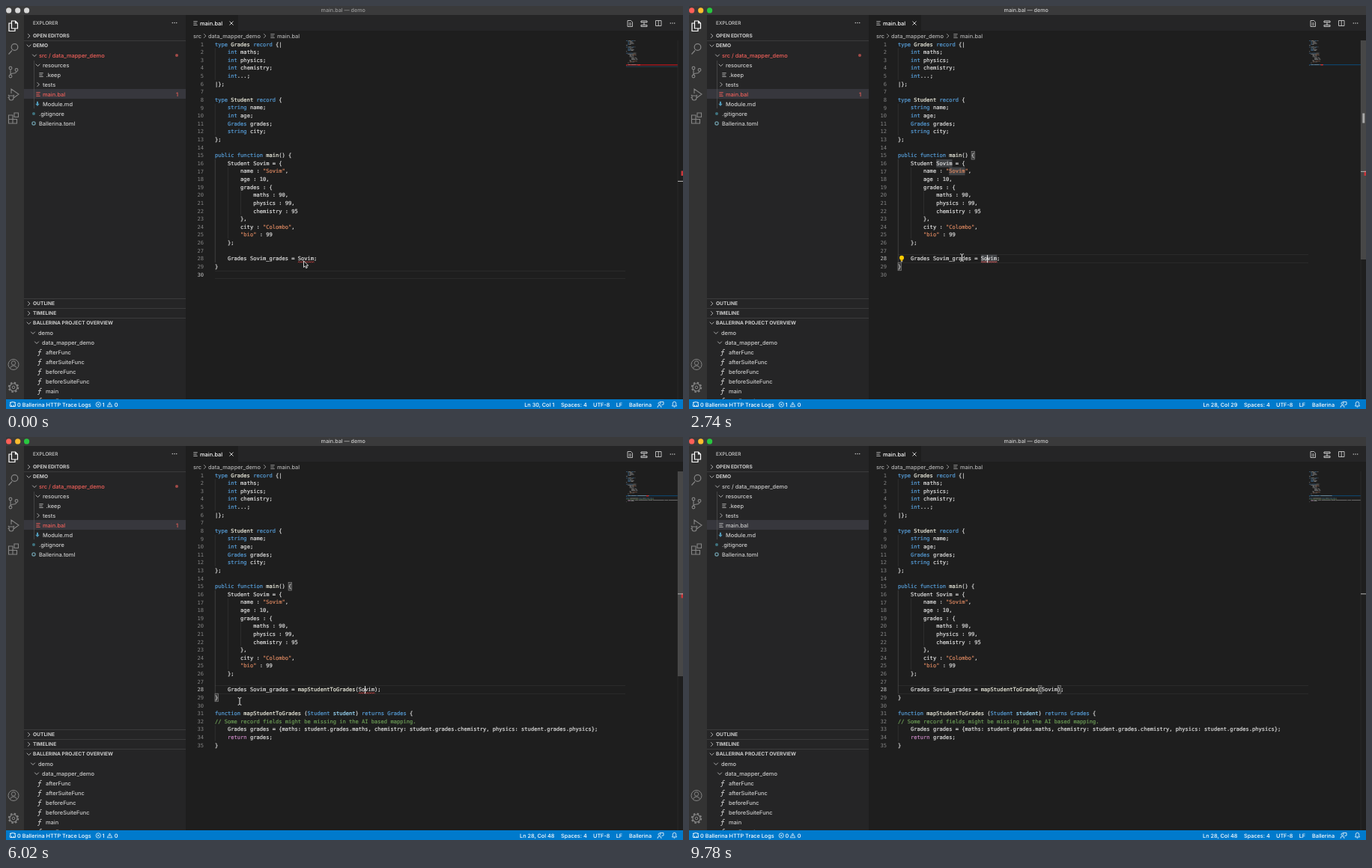
Animation of 904 by 539 pixels, one loop 9.88 s. Source, as an HTML page:

```html
<!DOCTYPE html>
<html lang="en">
<head>
<meta charset="utf-8">
<title>Editor demo</title>
<style>
html, body { margin: 0; width: 100%; height: 100%; overflow: hidden; background: #1e1e1e }
svg { display: block; width: 904px; height: 539px }
text { font: 500 7.43px Inter, Roboto, sans-serif; fill: #ccc; white-space: pre; text-rendering: geometricPrecision }
text.code { font: 7.085px "DejaVu Sans Mono", "Noto Sans Mono", monospace; fill: #dcdcdc; stroke: #dcdcdc; stroke-width: .2 }
text.num { fill: #858585; stroke: none; text-anchor: end }
text.head { font-size: 6.64px; font-weight: 700 }
text.small { font-size: 6.5px }
text.title { font-size: 7.15px; text-anchor: middle }
text.bar { font-size: 7.28px; fill: #fff }
text.link { font-size: 6.95px; font-weight: 600; fill: #2588e6 }
text.item { font-size: 7.7px; fill: #fff }
.err .bad { fill: #f1605a }
</style>
</head>
<body>
<svg id="stage" viewBox="0 0 904 539"></svg>
<script>
const LOOP = 9880, CW = 4.2655, LH = 10.62, LEFT = 279, MAP = 828;
const EDITED = 5870, CLICK = 800, FIXED = 6900;
const stage = document.getElementById('stage');

// markup helpers
const esc = s => s.replace(/&/g, '&amp;').replace(/</g, '&lt;');
const rect = (x, y, w, h, fill, more = '') => `<rect x="${x}" y="${y}" width="${w}" height="${h}" fill="${fill}" ${more}/>`;
const dot = (x, y, r, fill, more = '') => `<circle cx="${x}" cy="${y}" r="${r}" fill="${fill}" ${more}/>`;
const line = (d, color = '#ccc', w = .8) => `<path d="${d}" fill="none" stroke="${color}" stroke-width="${w}"/>`;
const text = (x, y, s, cls = '', more = '') => `<text x="${x}" y="${y + 2.6}" class="${cls}" ${more}>${esc(s)}</text>`;
const group = (id, body) => `<g id="${id}">${body}</g>`;
const arrow = (x, y, open) => line(open ? `M${x - 2.8} ${y - 1.3}l2.8 2.8 2.8-2.8` : `M${x - 1.4} ${y - 2.8}l2.8 2.8-2.8 2.8`);
const bars = (x, y, cls = '') => [-2.3, 0, 2.3].map((d, i) => rect(x - 2.7, y + d - .4, i == 1 ? 4.4 : 5.4, .9, '#bbb', `class="${cls}"`)).join('');
const dots = (x, y) => [-2.7, 0, 2.7].map(d => dot(x + d, y, .75, '#ccc')).join('');

const col = c => LEFT + c * CW;
const mid = n => 51 + (n - 1) * LH;
const wordBox = (n, c, len, fill, more) => rect(col(c), mid(n) - 5.2, len * CW, LH, fill, more);

// program text
const common = `type Grades record {|
    int maths;
    int physics;
    int chemistry;
    int...;
|};

type Student record {
    string name;
    int age;
    Grades grades;
    string city;
};

public function main() {
    Student Sovim = {
        name : "Sovim",
        age : 10,
        grades : {
            maths : 90,
            physics : 99,
            chemistry : 95
        },
        city : "Colombo",
        "bio" : 99
    };
`.split('\n');
const callOld = '    Grades Sovim_grades = Sovim;';
const callNew = '    Grades Sovim_grades = mapStudentToGrades(Sovim);';
const added = `function mapStudentToGrades (Student student) returns Grades {
// Some record fields might be missing in the AI based mapping.
    Grades grades = {maths: student.grades.maths, chemistry: student.grades.chemistry, physics: student.grades.physics};
    return grades;
}`.split('\n');

const rules = [
  ['#6a9955', '//.*'],
  ['#d7855f', '"[^"]*"'],
  ['#c586c0', '\\breturn\\b'],
  ['#569cd6', '\\b(?:type|record|int|string|public|function|returns)\\b|Grades(?= grades;)|Student(?= student)|(?<=returns )Grades'],
  ['#9cdcfe', 'student(?=\\))'],
  ['#ebebdd', '(?<=type )\\w+|main|mapStudentToGrades']
];
const lexer = new RegExp(rules.map(r => `(${r[1]})`).join('|'), 'g');

function tokens(s) {
  const out = [];
  let at = 0;
  for (const m of s.matchAll(lexer)) {
    out.push([s.slice(at, m.index), '#dcdcdc']);
    out.push([m[0], rules[m.slice(1).findIndex(Boolean)][0]]);
    at = m.index + m[0].length;
  }
  return out.concat([[s.slice(at), '#dcdcdc']]);
}

function codeLine(s, n) {
  const spans = tokens(s).map(([part, c]) => `<tspan fill="${c}" stroke="${c}">${esc(part)}</tspan>`).join('');
  return `<text class="code" x="${LEFT}" y="${mid(n) + 2.5}">${spans}</text>` + mapLine(s, n);
}

// one thin bar per word in the minimap
const mapY = n => 46.2 + (n - 1) * 1.18;
function mapLine(s, n) {
  let c = 0, out = '';
  for (const [part, color] of tokens(s)) {
    for (const m of part.matchAll(/\S+/g)) {
      const x = MAP + (c + m.index) * .59;
      if (x < 897) out += rect(x, mapY(n), Math.min(m[0].length * .59, 897 - x), .8, color, 'opacity=".5"');
    }
    c += part.length;
  }
  return out;
}
const codeBlock = (lines, first) => lines.map((s, i) => codeLine(s, first + i)).join('');
const numbers = (a, b) => Array.from({ length: b - a + 1 }, (_, i) =>
  text(264, mid(a + i), String(a + i), 'code num', `id="n${a + i}"`)).join('');
const guide = (c, a, b, color = '#3c3c3c') => line(`M${col(c) + .3} ${mid(a) - 5.3}V${mid(b) + 5.3}`, color, .6);
const currentLine = n => [-5.3, 5.3].map(d => rect(LEFT, Math.round(mid(n) + d), 548, 1, '#2a2a2a')).join('');
const squiggle = c => line(`M${col(c)} 343` + 'l1.35-1.3 1.35 1.3'.repeat(8), '#f14c4c');
const bracket = (n, c) => wordBox(n, c, 1, '#ffffff14', 'stroke="#999" stroke-width=".6"');

// overview ruler, pitch depends on the number of lines
const ruler = (pitch, cursorLine) =>
  rect(901.5, 45 + 27 * pitch, 2.5, 6.5, '#c8373b', 'class="mark"') +
  rect(897, 45.4 + (cursorLine - 1) * pitch, 7, 1.1, '#a8a8a8');

function chrome() {
  const rows = [
    [44, 66, 'src / data_mapper_demo', 'bad'], [49, 79, 'resources'], [53.5, 92, '.keep'], [49, 105, 'tests'],
    [49, 118, 'main.bal', 'bad'], [49, 131, 'Module.md'], [44, 144, '.gitignore'], [44, 157, 'Ballerina.toml'],
    [43, 437, 'demo'], [48, 450, 'data_mapper_demo']
  ];
  const funcs = ['afterFunc', 'afterSuiteFunc', 'beforeFunc', 'beforeSuiteFunc', 'main', 'testFunction'];
  return rect(0, 0, 904, 539, '#1e1e1e') + rect(0, 12, 25, 515, '#333') + rect(24, 12, 216, 515, '#252526') +
    rect(240, 12, 664, 21, '#252526') + rect(240, 12, 70, 21, '#1e1e1e') + rect(24, 111, 216, 13, '#37373d') +
    rect(0, 0, 904, 12, '#3a3a3b') +
    text(450.2, 5.8, 'main.bal — demo', 'title', 'id="title"') +
    [3.7, 15.7, 27.6].map((x, i) => dot(x, 5.9, 3.6, '#ddd', `id="light${i}"`)).join('') +
    // activity bar
    line('M7.5 20h5l3 3v7h-8zM12.5 20v3h3M7.5 23h-3.5v10.5h8v-3.5', '#fff', 1.2) +
    line('M8 59.5l-4.5 5M15.8 55a4.3 4.3 0 1 1-8.6 0a4.3 4.3 0 1 1 8.6 0', '#858585', 1.2) +
    line('M6 85v7M6 91.5q0-1 4-1.5t4-2.5', '#858585', 1.1) +
    [[6, 83], [6, 94], [14, 85.5]].map(p => dot(...p, 1.9, '#333', 'stroke="#858585" stroke-width="1.1"')).join('') +
    line('M7 117v-6l10 7-7 5M4 120h6v3a3 3 0 0 1-6 0zM3 119l1 1M11 119l-1 1M2.5 122.5h1.5M10 122.5h1.5', '#858585', 1.1) +
    line('M3.5 146h5.5v11h-5.5zM3.5 151.5h11v5.5h-5.5M11 143h5.5v5.5h-5.5z', '#858585', 1.1) +
    line('M17 479.5a7 7 0 1 1-14 0a7 7 0 1 1 14 0M12.7 477.5a2.7 2.7 0 1 1-5.4 0a2.7 2.7 0 1 1 5.4 0M5.5 484.5q1-3.5 4.5-3.5t4.5 3.5', '#858585', 1) +
    dot(10, 510, 5, 'none', 'stroke="#858585" stroke-width="1.2"') + dot(10, 510, 1.8, 'none', 'stroke="#858585"') +
    dot(10, 510, 6.3, 'none', 'stroke="#858585" stroke-width="1.8" stroke-dasharray="2.47"') +
    // side bar
    text(36, 22.8, 'EXPLORER', 'small') + dots(225, 22.5) +
    [46.5, 391.5, 404.5, 417.5].map(y => rect(24, y - .4, 216, .8, '#414142')).join('') +
    [['OPEN EDITORS', 40, 0], ['DEMO', 53, 1], ['OUTLINE', 398, 0], ['TIMELINE', 411, 0], ['BALLERINA PROJECT OVERVIEW', 424, 1]]
      .map(([s, y, open]) => arrow(30.5, y, open) + text(36, y - .2, s, 'head')).join('') +
    line('M37.5 73v64', '#585858', .6) +
    [[38, 66, 1], [42.5, 79, 1], [43, 105, 0], [36, 437, 1], [41, 450, 1]].map(a => arrow(...a)).join('') +
    rows.map(r => text(...r)).join('') + bars(47, 92) + bars(43, 118, 'bad') +
    rect(41, 127.8, 2, 3.2, '#519aba') + '<path d="M39.3 130.8h5.4l-2.7 3.3z" fill="#519aba"/>' +
    dot(37, 144, 2, '#3f7480') + dot(37, 157, 2.1, 'none', 'stroke="#6d9ba8" stroke-width="1.3"') +
    group('badge', dot(228, 66, 2, '#a34b48') + text(227, 118, '1', 'bad')) +
    funcs.map((s, i) => text(53, 463 + 13 * i, s) +
      line(`M47.8 ${459.5 + 13 * i}q-2.2-1.2-2.6 1.5l-.8 5q-.5 2.5-2.2 1.5M43 ${462.5 + 13 * i}h4`, '#ccc', .9)).join('') +
    // tab row and breadcrumb
    bars(253, 23) + text(259, 23, 'main.bal', '', 'style="fill:#fff"') + line('M298.5 20.5l5 5m0-5l-5 5', '#ddd', .9) +
    line('M830 19.5h4.5l2 2v6h-6.5zM831.5 23h3.5M831.5 25.2h3.5', '#ccc', .9) +
    line('M848 20h8v2h-8zM848 25.5h8v2h-8zM852 22v3.5', '#ccc', 1) +
    line('M867.5 19.5h7.5v7h-7.5zM871.2 19.5v7', '#ccc', .9) + dots(890, 23) +
    '<g opacity=".85">' + text(250, 40, 'src') + arrow(265.5, 40) + text(270, 40, 'data_mapper_demo') + arrow(345.5, 40) +
    bars(356, 40) + text(362, 40, 'main.bal') + '</g>';
}

function statusBar() {
  return rect(0, 526, 904, 13, '#007acc') +
    line('M5.5 535.5v-2.5a3.5 3.5 0 0 1 7 0v2.5zM7.5 536v-2.5M10.5 536v-2.5M5 531l1.5-1.5M13 531l-1.5-1.5', '#fff', .9) +
    text(15, 533, '0 Ballerina HTTP Trace Logs', 'bar') +
    line('M126.5 533a3.2 3.2 0 1 1-6.4 0a3.2 3.2 0 1 1 6.4 0M122 531.7l2.6 2.6m0-2.6l-2.6 2.6', '#fff', .7) +
    text(128.5, 533, '1', 'bar', 'id="errors"') + line('M138.5 530l3.3 5.8h-6.6zM138.5 532v2', '#fff', .7) + text(144.7, 533, '0', 'bar') +
    text(732.3, 533, '', 'bar', 'id="place" text-anchor="end"') +
    [[741, 'Spaces: 4'], [784, 'UTF-8'], [814.7, 'LF'], [832, 'Ballerina']].map(([x, s]) => text(x, 533, s, 'bar')).join('') +
    line('M874 531.5a1.5 1.5 0 1 1-3 0a1.5 1.5 0 1 1 3 0M870 537q0-3 2.5-3t2.5 3M873 529.5h5v3.5h-1.5l-1 1.2', '#fff') +
    line('M889.5 535h6l-.8-1.5v-2a2.2 2.2 0 0 0-4.4 0v2zM891.7 536.2h1.6', '#fff');
}

stage.innerHTML = chrome() +
  group('lineEnd', currentLine(30) + rect(MAP, mapY(30), 69, 1.2, '#213a49') + rect(MAP, mapY(28), 69, 1.4, '#a5161b')) +
  group('lineCall', currentLine(28) + rect(MAP, mapY(28), 69, 1.1, '#0e4670')) +
  group('words', [[16, 12], [17, 16], [28, 26]].map(([n, c]) => wordBox(n, c, 5, '#414346')).join('')) +
  group('braces', bracket(15, 23) + bracket(29, 0)) + group('parens', bracket(28, 44) + bracket(28, 50)) +
  guide(0, 2, 5) + guide(0, 9, 12) + guide(0, 16, 28, '#555') + guide(4, 17, 25) + guide(8, 20, 22) +
  numbers(1, 30) + codeBlock(common, 1) + codeLine('}', 29) +
  group('before', codeLine(callOld, 28) + squiggle(26) + rect(MAP + 15.5, mapY(28), 3.2, 1.3, '#e02a2a')) +
  group('after', guide(0, 33, 34) + numbers(31, 35) + codeLine(callNew, 28) + codeBlock(added, 31) +
    group('wave', squiggle(45) + rect(MAP + 27, mapY(28), 3.2, 1.3, '#e02a2a'))) +
  rect(896.7, 46, .6, 480, '#343434') +
  group('slider', rect(897, 46, 7, 293, '#797979', 'opacity=".45" id="thumb"')) +
  group('rulerWords', rect(899.3, 143.5, 3, 13, '#a8a8a8')) +
  group('rulerEnd', ruler(6.5, 30)) + group('rulerCall', ruler(6.5, 28)) + group('rulerNew', ruler(6.07, 28)) +
  group('bulb', dot(284, 336.8, 3, '#ffcc00') + rect(282.7, 339, 2.6, 2.6, '#e0b000') + rect(282.9, 341.1, 2.2, 1.3, '#aaa')) +
  group('caret', rect(0, 333, 1.1, 10.4, '#ddd')) +
  group('tip', rect(390.5, 293.5, 439, 40, '#252526', 'stroke="#454545" stroke-width=".8"') + rect(391, 320.5, 438, 12.6, '#2c2c2d') +
    rect(391, 320, 438, .7, '#3e3e3f') +
    text(395, 301.7, "incompatible types: expected 'tamreli/data_mapper_demo:0.1.0:Grades', found", 'code') +
    text(395, 312.2, "'tamreli/data_mapper_demo:0.1.0:Student'", 'code') +
    text(395, 327, 'Peek Problem (⌥F8)', 'link') + text(473, 327, 'Quick Fix... (⌘.)', 'link')) +
  group('menu', rect(286.6, 344.8, 128, 14.6, '#0a58ce', 'rx="1.5" stroke="#8d9199" stroke-width="1.2"') +
    text(299, 351.7, 'Generate mapping function', 'item')) +
  statusBar() +
  group('mouse',
    group('pointer', '<path d="M0 0v8.5l2-1.8 1.3 3 1.5-.7-1.3-2.9h2.7z" fill="#111" stroke="#fff" stroke-width=".8"/>') +
    group('beam', [['#1e1e1e', 2], ['#f0f0f0', 1]].map(([c, w]) =>
      line('M-2.3-4.8q2 0 2.3 1v7.6q.3 1 2.3 1M2.3-4.8q-2 0-2.3 1M0 3.8q-.3 1-2.3 1', c, w)).join('')));

const el = {};
stage.querySelectorAll('[id]').forEach(e => el[e.id] = e);
const marks = stage.querySelectorAll('.mark');
const toggle = (e, on) => e.style.display = on ? '' : 'none';
const show = (id, on) => toggle(el[id], on);
const ramp = (t, a, b) => Math.min(1, Math.max(0, (t - a) / (b - a)));

// time, x, y of the mouse
const path = [
  [0, 397.5, 341], [149, 397.5, 341], [150, 399, 345.5], [480, 399, 345.5], [950, 401, 339.5], [2450, 401, 339.5],
  [2740, 364.5, 336.5], [3040, 364.5, 336.5], [3630, 285, 336], [4380, 285, 336], [4680, 311.5, 356], [5120, 312, 355.5],
  [5869, 312, 355.5], [5870, 312, 353.5], [6620, 312, 353.5], [7540, 495.5, 364], [8290, 495.5, 364], [9030, 520, 548], [LOOP, 520, 548]
];
function mouseAt(t) {
  const i = path.findIndex(p => p[0] > t);
  const [a, b] = [path[i - 1], path[i]];
  const k = ramp(t, a[0], b[0]), e = k * k * (3 - 2 * k);
  return [1, 2].map(j => a[j] + (b[j] - a[j]) * e);
}

function caretOn(t) {
  if (t < CLICK) return false;
  if (t < 1550) return true;
  if (t < EDITED) return Math.floor((t - 1550) / 502) % 2 == 0;
  return t < 6620 || Math.floor((t - 6680) / 500) % 2 == 1;
}

function draw(t) {
  const active = t >= CLICK, edited = t >= EDITED, error = t < FIXED;
  stage.classList.toggle('err', error);
  ['#ff5f57', '#febc2e', '#28c840'].forEach((c, i) => el['light' + i].setAttribute('fill', active ? c : '#d8d8d8'));
  el.title.style.fill = active ? '#ccc' : '#999';
  el.n28.style.fill = active ? '#c6c6c6' : '';
  el.n30.style.fill = active ? '' : '#c6c6c6';
  show('lineEnd', !active);
  show('lineCall', active);
  show('words', t >= 950 && !edited);
  show('rulerWords', t >= 950 && !edited);
  show('braces', active && error);
  show('parens', !error);
  show('before', !edited);
  show('after', edited);
  show('wave', error);
  show('badge', error);
  show('rulerEnd', !active);
  show('rulerCall', active && !edited);
  show('rulerNew', edited);
  marks.forEach(e => toggle(e, error));
  show('bulb', t >= 1100 && !edited);
  show('tip', t >= 1550 && t < 2590);
  show('menu', t >= 4080 && !edited);
  show('caret', caretOn(t));
  el.caret.setAttribute('transform', `translate(${col(edited ? 47 : 28) - .5})`);
  el.slider.style.opacity = ramp(t, 480, 800) * (1 - ramp(t, 9200, 9760));
  el.thumb.setAttribute('height', edited ? 274 : 293);
  el.errors.textContent = error ? '1' : '0';
  el.place.textContent = !active ? 'Ln 30, Col 1' : edited ? 'Ln 28, Col 48' : 'Ln 28, Col 29';
  const pointing = t < 150 || t > 3480 && !edited;
  show('pointer', pointing);
  show('beam', !pointing);
  el.mouse.setAttribute('transform', `translate(${mouseAt(t)})`);
}

const start = performance.now();
function tick() {
  draw((performance.now() - start) % LOOP);
  requestAnimationFrame(tick);
}
tick();
</script>
</body>
</html>
```
